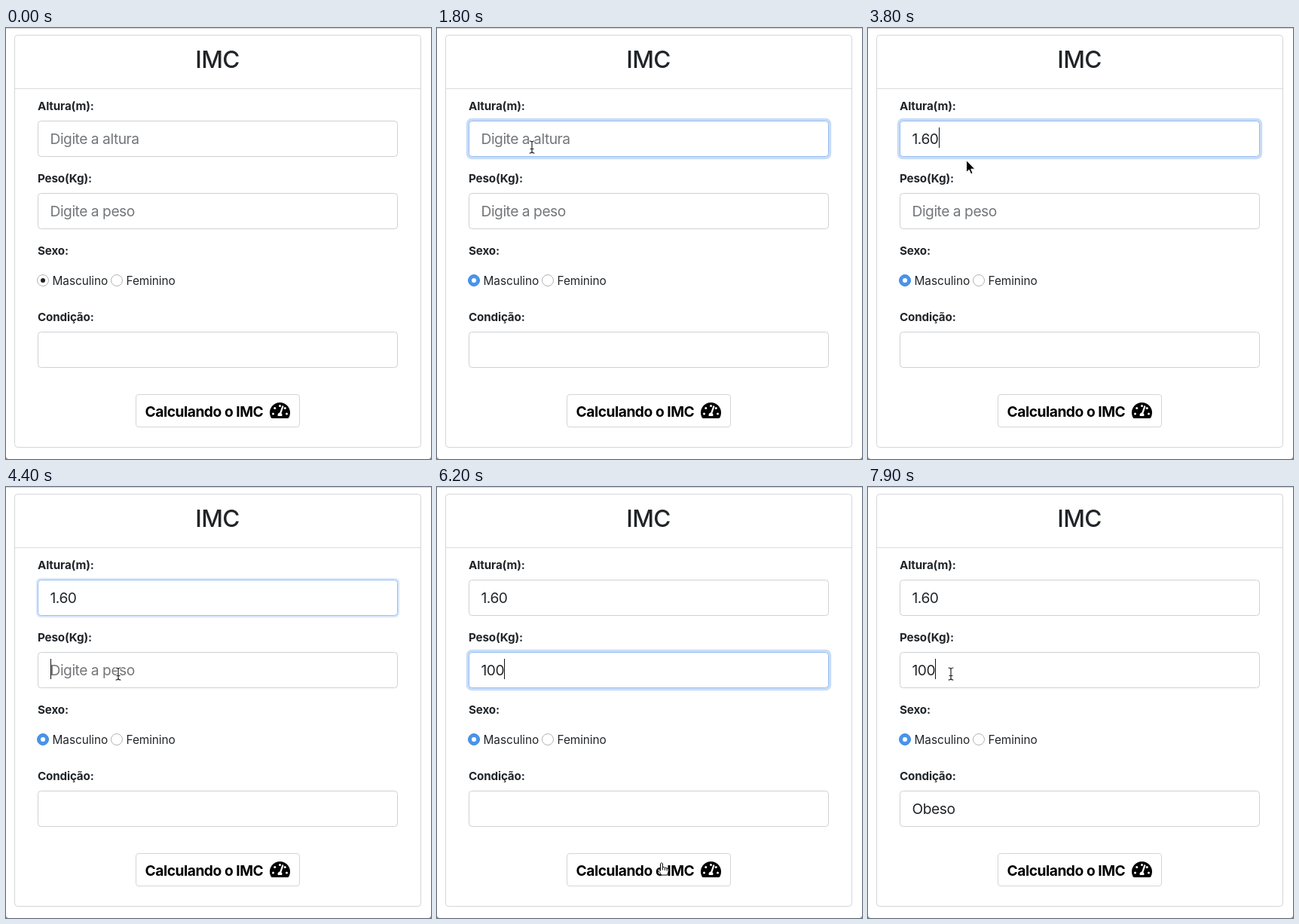
Animation, 564 px wide and 572 px high, one loop 8000 ms. Source, as an HTML page:

```html
<!DOCTYPE html>
<html lang="pt">
<head>
<meta charset="utf-8">
<title>IMC</title>
<style>
  html, body { margin: 0; width: 100%; height: 100%; overflow: hidden; background: #fff; }
  svg { display: block; font-family: Inter, "Open Sans", sans-serif; fill: #212529; }
  .title { font-size: 31.5px; font-weight: 500; letter-spacing: -.02em; text-anchor: middle; }
  .label { font-size: 15.2px; font-weight: 700; letter-spacing: -.01em; }
  .option { font-size: 15.4px; letter-spacing: -.005em; }
  .value { font-size: 19.2px; letter-spacing: -.024em; }
  .button { font-size: 19.2px; font-weight: 700; letter-spacing: -.024em; fill: #000; }
  .line { fill: #fff; stroke: #d3d5d7; }
</style>
</head>
<body>
<svg width="564" height="572" viewBox="0 0 564 572">
  <path d="M0 .5H564" stroke="#d4d4d4"/>
  <path d="M0 568V572H4Q0 572 0 568M564 568V572H560Q564 572 564 568" fill="#888"/>
  <rect class="line" x="11.5" y="9.5" width="539" height="547" rx="4"/>
  <path d="M12 80.5H550" stroke="#dcdcdc"/>
  <text class="title" x="280.5" y="53">IMC</text>

  <text class="label" x="42" y="109">Altura(m):</text>
  <text class="label" x="42" y="205">Peso(Kg):</text>
  <text class="label" x="42" y="301">Sexo:</text>
  <text class="label" x="42" y="389">Condição:</text>
  <g id="fields"></g>

  <circle id="ring" cx="49" cy="335" r="7.5"/>
  <circle id="dot" cx="49" cy="335" r="3"/>
  <circle cx="147" cy="335" r="7.5" fill="#fff" stroke="#b4b4b4"/>
  <text class="option" x="61.5" y="341">Masculino</text>
  <text class="option" x="159.5" y="341">Feminino</text>

  <rect class="line" x="172.5" y="486.5" width="217" height="43" rx="3.5"/>
  <text class="button" x="184.5" y="516">Calculando o IMC</text>
  <g transform="translate(350 495.5) scale(.0469)">
    <path fill="#000" d="M288 32C129 32 0 161 0 320c0 53 14 102 39 145 6 9 16 15 27 15h444c11 0 21-6 27-15 25-43 39-92 39-145C576 161 447 32 288 32z"/>
    <g fill="#fff">
      <circle cx="288" cy="128" r="32"/><circle cx="144" cy="192" r="32"/>
      <circle cx="96" cy="352" r="32"/><circle cx="480" cy="352" r="32"/>
      <circle cx="432" cy="192" r="32"/>
      <path d="M391 152 329 336c14 11 23 28 23 48 0 12-3 23-9 32H233c-6-9-9-20-9-32 0-34 27-61 60-64l61-184c10-25 48-15 46 16z"/>
    </g>
  </g>

  <path id="caret" stroke="#111"/>
  <g id="pointer" stroke-linejoin="round" stroke-linecap="round">
    <path id="arrow" d="M0 0V15.5L3.6 12.2 6 17.8 8.5 16.8 6.1 11.2H11z" fill="#000" stroke="#fff"/>
    <g id="beam" fill="none">
      <path d="M-3-8Q0-8 0-6Q0-8 3-8M0-6V6M-3 8Q0 8 0 6Q0 8 3 8M-2 2.5H2" stroke="#fff" stroke-width="3"/>
      <path d="M-3-8Q0-8 0-6Q0-8 3-8M0-6V6M-3 8Q0 8 0 6Q0 8 3 8M-2 2.5H2" stroke="#222" stroke-width="1.2"/>
    </g>
    <path id="hand" d="M-3.5 2V-7Q-2-10-.5-7V-2Q1-4 2.3-1.5 4-3 5-.8 7.5-1.5 7.3 2 7.2 5 5.3 8H-2.5Q-4 4-7 1.5-7.5-2-3.5 2zM-.5-2V1M2.3-1.5V1.5M5-.8V2" fill="#fff" stroke="#111"/>
  </g>
</svg>
<script>
const $ = id => document.getElementById(id);
const clamp = v => Math.max(0, Math.min(1, v));
const mix = (a, b, k) => a + (b - a) * k;
const LOOP = 8000, STEP = 100;

// keys: when each character appears; focus: [start, end] pairs of the glow
const fields = [
  { y: 123, hint: 'Digite a altura', text: '1.60', keys: [2600, 2800, 3200, 3400], focus: [[1050, 4350]] },
  { y: 219, hint: 'Digite a peso', text: '100', keys: [4800, 5000, 5200], focus: [[4400, 6400], [7900, 9000]] },
  { y: 403, hint: '', text: 'Obeso', keys: Array(5).fill(6500), focus: [] }
];

function add(tag, attrs) {
  const el = document.createElementNS('http://www.w3.org/2000/svg', tag);
  for (const k in attrs) el.setAttribute(k, attrs[k]);
  return $('fields').appendChild(el);
}

for (const f of fields) {
  f.glow = add('rect', { fill: '#c8dcf8' });
  f.box = add('rect', { x: 42.5, y: f.y + .5, width: 477, height: 47, rx: 4, fill: '#fff' });
  f.label = add('text', { class: 'value', x: 58.5, y: f.y + 31 });
}

// caret sessions: field, start, end, moments that restart the blink
const carets = [
  [0, 1100, 4400, [1100, ...fields[0].keys]],
  [1, 4400, 6400, [4400, ...fields[1].keys]],
  [1, 7900, 8000, [7900]]
];

// pointer path: time, x, y
const path = [
  [200, 300, 572], [500, 240, 400], [800, 140, 190], [1000, 126, 158], [3700, 126, 158],
  [4200, 149, 248], [5500, 149, 248], [5800, 210, 370], [6200, 300, 507],
  [7200, 300, 507], [7500, 215, 390], [7800, 110, 248], [8000, 110, 248]
];
const hidden = [[0, 200], [2600, 3700], [4700, 5500]];
const within = (t, [a, b]) => t >= a && t < b;

function drawField(f, t) {
  const n = f.keys.filter(k => k <= t).length;
  f.label.textContent = n ? f.text.slice(0, n) : f.hint;
  f.label.setAttribute('fill', n ? '#212529' : '#737679');
  const g = Math.max(0, ...f.focus.map(([a, b]) => Math.min(clamp((t - a) / 150), 1 - clamp((t - b) / 150))));
  const s = 3.2 * g;
  const r = { x: 42 - s, y: f.y - s, width: 478 + 2 * s, height: 48 + 2 * s, rx: 4 + s, opacity: g };
  for (const k in r) f.glow.setAttribute(k, r[k]);
  const tone = [[206, 150], [208, 190], [211, 238]].map(([a, b]) => mix(a, b, Math.min(1, g * 1.4)));
  f.box.setAttribute('stroke', `rgb(${tone})`);
}

function drawCaret(t) {
  const c = carets.find(([, a, b]) => within(t, [a, b]));
  let d = '';
  if (c) {
    const f = fields[c[0]];
    const last = Math.max(...c[3].filter(k => k <= t));
    const typed = f.keys[0] <= t;
    const x = Math.round(58.5 + (typed ? f.label.getComputedTextLength() : 0)) + .5;
    if ((t - last) % 1000 < 500) d = `M${x} ${f.y + 9}v27`;
  }
  $('caret').setAttribute('d', d);
}

function drawPointer(t) {
  const show = !hidden.some(h => within(t, h));
  $('pointer').style.display = show ? '' : 'none';
  if (!show) return;
  const i = path.findIndex((p, j) => j && t <= p[0]);
  const [a, b] = [path[i - 1], path[i]];
  const k = clamp((t - a[0]) / (b[0] - a[0]));
  const x = mix(a[1], b[1], k), y = mix(a[2], b[2], k);
  const inside = x > 42 && x < 520 && fields.some(f => y > f.y && y < f.y + 48);
  const kind = inside ? 'beam' : x > 172 && x < 390 && y > 486 && y < 530 ? 'hand' : 'arrow';
  for (const id of ['arrow', 'beam', 'hand']) $(id).style.display = id === kind ? '' : 'none';
  $('pointer').setAttribute('transform', `translate(${x} ${y})`);
}

function drawRadio(t) {
  const active = t >= 1100;
  $('ring').setAttribute('fill', active ? '#4a94ea' : '#fff');
  $('ring').setAttribute('stroke', active ? '#4089e0' : '#b4b4b4');
  $('dot').setAttribute('fill', t < 1000 ? '#222' : '#fff');
}

function frame() {
  const t = Math.floor(performance.now() % LOOP / STEP) * STEP;
  fields.forEach(f => drawField(f, t));
  drawCaret(t);
  drawPointer(t);
  drawRadio(t);
  requestAnimationFrame(frame);
}
frame();
</script>
</body>
</html>
```
